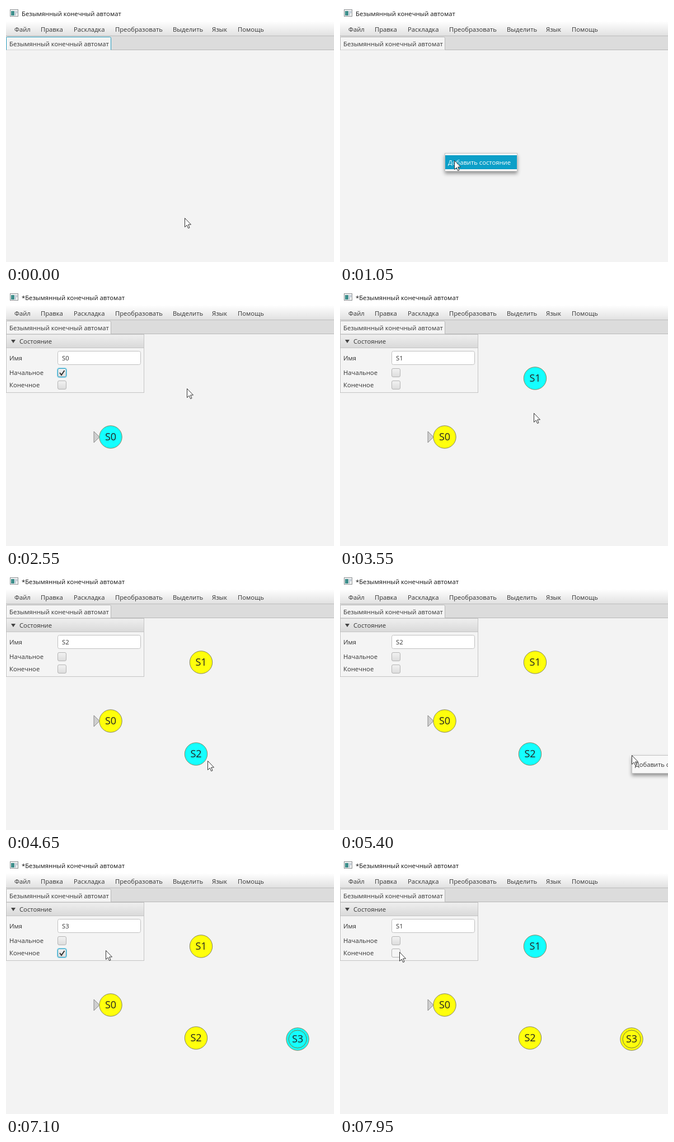
An HTML page that plays this animation: 586x458 px, repeating every 8000 ms.

```html
<!DOCTYPE html>
<html lang="ru">
<head>
<meta charset="utf-8">
<title>Конечный автомат</title>
<style>
  html, body { margin: 0; width: 100%; height: 100%; overflow: hidden; background: #f3f3f3; }
  svg { display: block; width: 586px; height: 458px; }
  text { font: 11.25px "Open Sans", "Noto Sans", sans-serif; fill: #333; white-space: pre; }
  .label { font-size: 18px; fill: #222; text-anchor: middle; }
</style>
</head>
<body>
<svg id="stage" viewBox="0 0 586 458">
  <defs>
    <linearGradient id="bar" x2="0" y2="1"><stop stop-color="#fefefe"/><stop offset="1" stop-color="#e0e0e0"/></linearGradient>
    <linearGradient id="head" x2="0" y2="1"><stop stop-color="#efefef"/><stop offset="1" stop-color="#d9d9d9"/></linearGradient>
    <linearGradient id="box" x2="0" y2="1"><stop stop-color="#f2f2f2"/><stop offset="1" stop-color="#dcdcdc"/></linearGradient>
    <filter id="shadow" x="-20%" y="-50%" width="140%" height="220%">
      <feDropShadow dx="0" dy="4" stdDeviation="3" flood-color="#000" flood-opacity=".4"/>
    </filter>
  </defs>
</svg>
<script>
const LOOP = 8000, STEP = 50;
const stage = document.getElementById('stage');

function add(parent, tag, attrs = {}, content = '') {
  const node = document.createElementNS('http://www.w3.org/2000/svg', tag);
  set(node, attrs);
  node.textContent = content;
  return parent.appendChild(node);
}
function set(node, attrs) {
  for (const key in attrs) node.setAttribute(key, attrs[key]);
}
function show(node, visible) {
  node.setAttribute('visibility', visible ? 'inherit' : 'hidden');
}
const rect = (parent, x, y, width, height, fill, more = {}) =>
  add(parent, 'rect', { x, y, width, height, fill, ...more });
const path = (parent, d, attrs) => add(parent, 'path', { d, ...attrs });
const text = (parent, x, y, content, attrs = {}) => add(parent, 'text', { x, y, ...attrs }, content);

// Window frame
const NAME = 'Безымянный конечный автомат';
rect(stage, 0, 0, 586, 458, '#f3f3f3');
rect(stage, 0, 0, 586, 28, '#fff');
rect(stage, 7.5, 6.5, 14, 12, '#f4f4f4', { stroke: '#8b8f92' });
rect(stage, 9, 9, 6, 8, '#3f8f8c');
rect(stage, 16, 9, 2, 8, '#b9c4d0');
rect(stage, 19, 9, 1, 4, '#8ea3b8');
const title = text(stage, 28, 18, NAME, { style: 'fill:#111' });
rect(stage, 0, 28, 586, 26, 'url(#bar)');
rect(stage, 0, 53, 586, 1, '#bdbdbd');
const menuBar = { 15: 'Файл', 62: 'Правка', 121: 'Раскладка', 195: 'Преобразовать',
  298: 'Выделить', 368: 'Язык', 414: 'Помощь' };
for (const x in menuBar) text(stage, x, 46, menuBar[x]);
rect(stage, 0, 54, 586, 25, '#dcdcdc');
rect(stage, 0, 78, 586, 1, '#b8b8b8');
const tab = path(stage, 'M.5 78.5V57.5Q.5 55.5 2.5 55.5H185.5Q187.5 55.5 187.5 57.5V78.5', { fill: '#f4f4f4' });
text(stage, 6, 72, NAME);

// Property panel
const panel = add(stage, 'g');
rect(panel, .5, 79.5, 246, 104, '#f4f4f4', { stroke: '#c4c4c4' });
rect(panel, .5, 79.5, 246, 24, 'url(#head)', { stroke: '#c4c4c4' });
path(panel, 'M9 89H17L13 95Z', { fill: '#444' });
text(panel, 24, 96, 'Состояние');
text(panel, 6, 126, 'Имя');
text(panel, 6, 152, 'Начальное');
text(panel, 6, 174, 'Конечное');
rect(panel, 92.5, 109.5, 148, 24, '#fff', { rx: 3, stroke: '#c0c0c0' });
const nameField = text(panel, 100, 126, '');

function makeCheckBox(y) {
  const ring = rect(panel, 91.5, y - 1, 17, 17, 'none', { rx: 3.5, stroke: '#a9dcec', 'stroke-width': 1.5 });
  const box = rect(panel, 92.5, y, 15, 15, 'url(#box)', { rx: 2.5 });
  const mark = path(panel, `M96 ${y + 7.5}l3 4 5.5 -8`, { fill: 'none', stroke: '#333', 'stroke-width': 2 });
  return (checked, focused, hover) => {
    show(ring, focused);
    show(mark, checked);
    set(box, { stroke: focused ? '#1b9dc4' : '#b4b4b4', fill: hover ? '#f5f5f5' : 'url(#box)' });
  };
}
const initialBox = makeCheckBox(140.5), finalBox = makeCheckBox(162.5);

// States; each is created through a context menu opened at its centre
const states = [
  { x: 187, y: 263, opens: 750, hover: 950, born: 1200 },
  { x: 348.5, y: 158, opens: 2900, hover: 3000, born: 3300 },
  { x: 339.5, y: 322, opens: 3950, hover: 4050, born: 4400 },
  { x: 521, y: 324, opens: 5400, hover: 5500, born: 5850 }
];
const INITIAL_AT = 2200, FINAL_AT = 6850, RESELECT_AT = 7450;

const arrow = path(stage, 'M157 253V273L167 263Z', { fill: '#cfcfcf', stroke: '#8a8a8a' });
states.forEach((s, i) => {
  s.group = add(stage, 'g', { transform: `translate(${s.x} ${s.y})` });
  s.disc = add(s.group, 'circle', { r: 20.2, stroke: '#858560' });
  s.ring = add(s.group, 'circle', { r: 16, fill: 'none', stroke: '#77773c' });
  text(s.group, 0, 6.4, 'S' + i, { class: 'label' });
});

const popup = add(stage, 'g');
rect(popup, .5, .5, 129, 32, '#f8f8f8', { stroke: '#c4c4c4', filter: 'url(#shadow)' });
const item = rect(popup, 1, 4, 128, 25, '#0c9fc8');
const itemText = text(popup, 6, 21, 'Добавить состояние');

const cursor = path(stage, 'M.5 .5V16.5L4.2 13L6.6 18.6L9 17.6L6.6 12H11.5Z',
  { fill: '#fff', stroke: '#333', 'stroke-width': 1 });

// Cursor route: time, x, y; repeated places are rests
const route = [
  [0, 319, 379], [50, 319, 379], [650, 187, 263], [850, 187, 263],
  [1050, 204, 276], [1400, 204, 276], [2050, 99, 147], [2250, 99, 147],
  [2550, 323, 176], [2800, 348, 158], [2950, 348, 158],
  [3150, 364, 171], [3350, 364, 171], [3550, 346, 220], [3700, 340, 283], [3850, 339, 322], [4000, 339, 322],
  [4200, 356, 335], [4550, 356, 335], [4650, 360, 334], [5250, 521, 324], [5450, 521, 324],
  [5650, 538, 338], [5900, 538, 338], [6150, 489, 326], [6700, 100, 168], [6950, 100, 168],
  [7350, 348, 158], [7500, 348, 158], [7900, 115, 168], [7950, 106, 168], [8000, 106, 168]
];
const samePlace = (a, b) => a[1] === b[1] && a[2] === b[2];
function slope(i, axis) {
  const prev = route[i - 1], here = route[i], next = route[i + 1];
  if (!prev || !next || samePlace(prev, here) || samePlace(here, next)) return 0;
  return (next[axis] - prev[axis]) / (next[0] - prev[0]);
}
function cursorAt(t) {
  const i = route.findIndex(p => p[0] > t) - 1;
  const a = route[i], b = route[i + 1], span = b[0] - a[0], u = (t - a[0]) / span;
  return [1, 2].map(axis =>
    a[axis] + (b[axis] - a[axis]) * u * u * (3 - 2 * u) +
    span * u * (1 - u) * (slope(i, axis) * (1 - u) - slope(i + 1, axis) * u));
}

function render(t) {
  const count = states.filter(s => t >= s.born).length;
  const selected = t >= RESELECT_AT ? 1 : count - 1;
  const hasInitial = t >= INITIAL_AT, hasFinal = t >= FINAL_AT;
  const [x, y] = cursorAt(t).map(Math.round);
  const over = top => x >= 92 && x <= 108 && y >= top && y <= top + 16;

  title.textContent = (count ? '*' : '') + NAME;
  set(tab, { stroke: t < states[0].opens ? '#2a9fc0' : '#b8b8b8' });

  show(panel, count > 0);
  nameField.textContent = 'S' + selected;
  initialBox(hasInitial && selected === 0, hasInitial && t < states[1].opens, over(140));
  finalBox(hasFinal && selected === 3, hasFinal && t < RESELECT_AT, over(162));

  show(arrow, hasInitial);
  states.forEach((s, i) => {
    show(s.group, t >= s.born);
    show(s.ring, i === 3 && hasFinal);
    set(s.disc, { fill: i === selected ? '#14ffff' : '#ffff0c' });
  });

  const open = states.find(s => t >= s.opens && t < s.born);
  show(popup, Boolean(open));
  if (open) {
    const lit = t >= open.hover;
    set(popup, { transform: `translate(${Math.floor(open.x)} ${open.y})` });
    show(item, lit);
    itemText.style.fill = lit ? '#fff' : '#333';
  }
  set(cursor, { transform: `translate(${x} ${y})` });
}

// Hidden parents must also hide children marked visible, so "inherit" is used in show()
const start = performance.now();
function tick() {
  const t = (performance.now() - start) % LOOP;
  render(Math.floor(t / STEP) * STEP);
  requestAnimationFrame(tick);
}
render(0);
tick();
</script>
</body>
</html>
```
